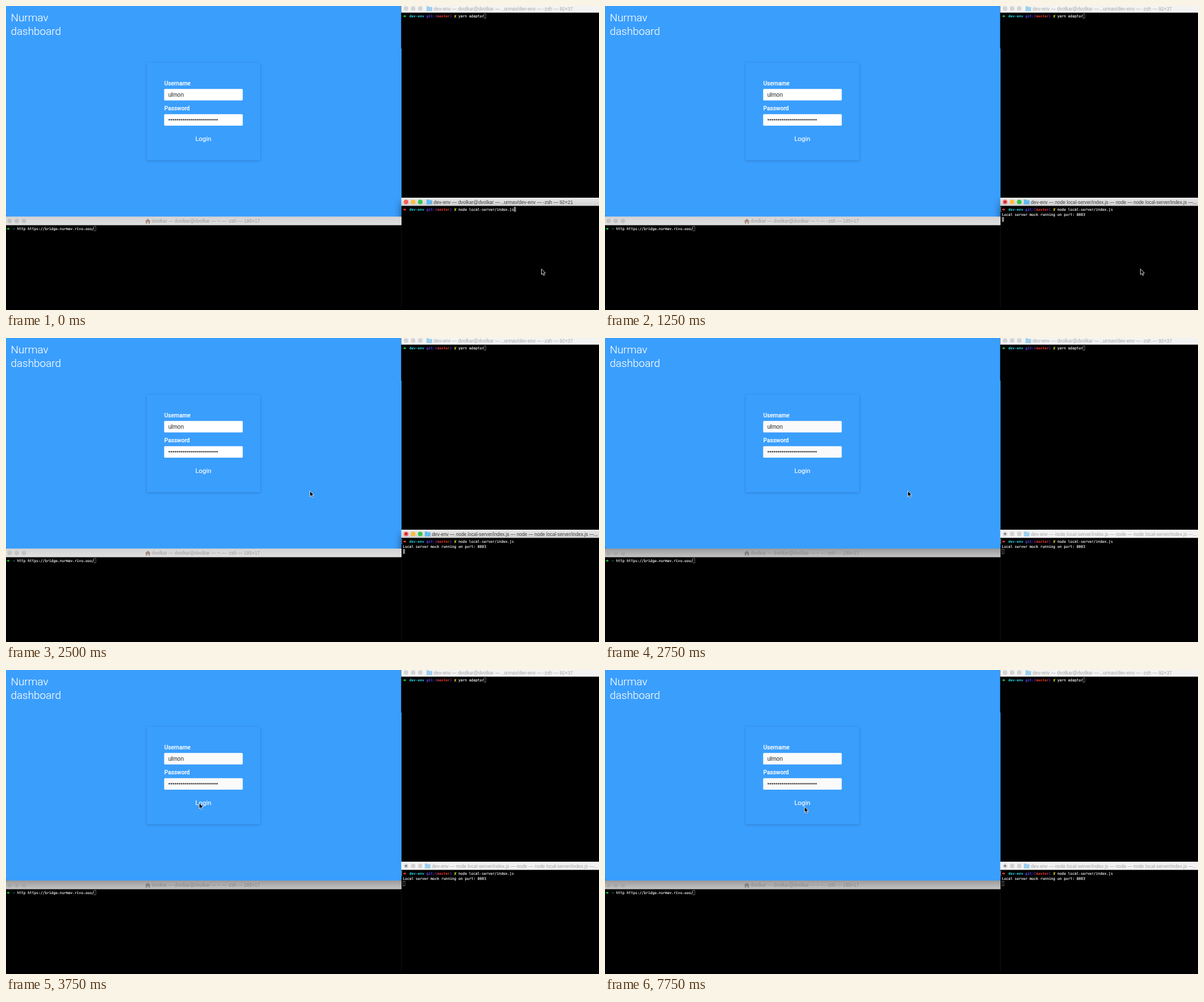
An HTML page for the animation above (8000 ms loop, 1045 by 536 pixels).

```html
<!DOCTYPE html>
<html lang="en">
<head>
<meta charset="utf-8">
<title>Dashboard login</title>
<style>
  html, body { margin: 0; width: 100%; height: 100%; overflow: hidden; background: #000; }
  svg { display: block; width: 100%; height: 100%; }
  text { white-space: pre; }
  .title { font: 8.45px "Liberation Sans", Arial, sans-serif; }
  .term { font: 6.25px "DejaVu Sans Mono", monospace; fill: #fff; stroke: #fff; stroke-width: .15px; }
  .term .c { font-weight: bold; stroke: none; }
  .web { font-family: Roboto, sans-serif; fill: #fff; }
  .web text { stroke: #fff; stroke-width: .15px; }
  .web .typed { font-family: "Liberation Sans", Arial, sans-serif; fill: #222; stroke: none; }
</style>
</head>
<body>
<svg id="stage" viewBox="0 0 1045 536">
  <defs>
    <filter id="blur" x="-20%" y="-20%" width="140%" height="140%"><feGaussianBlur stdDeviation="7"/></filter>
    <filter id="soft" x="-10%" y="-10%" width="120%" height="120%"><feGaussianBlur stdDeviation="2.2"/></filter>
    <linearGradient id="active" x2="0" y2="1"><stop stop-color="#e9e9e9"/><stop offset="1" stop-color="#d0d0d0"/></linearGradient>
    <linearGradient id="shade" x2="0" y2="1"><stop stop-color="#9a9a9a"/><stop offset="1" stop-color="#c4c4c4"/></linearGradient>
    <linearGradient id="dim" x2="0" y2="1"><stop stop-color="#d2d2d2"/><stop offset="1" stop-color="#e0e0e0"/></linearGradient>
    <clipPath id="pageClip"><rect width="697" height="371.5"/></clipPath>
  </defs>
  <rect width="1045" height="536"/>
  <g id="left"></g>
  <g id="page" class="web" clip-path="url(#pageClip)">
    <path d="M0 0H697V368.5Q697 371.5 694 371.5H3Q0 371.5 0 368.5Z" fill="#3a9efd"/>
    <rect x="696" width="1" height="75" fill="#16395c"/>
    <g font-size="18.9" font-weight="300">
      <text x="8.5" y="27">Nurmav</text>
      <text x="8.5" y="51">dashboard</text>
    </g>
    <rect x="248" y="101" width="200" height="172" fill="#000" opacity=".2" filter="url(#soft)"/>
    <rect x="248" y="100" width="200" height="172" rx="1" fill="#3a9efd"/>
    <g font-size="10.15" font-weight="500">
      <text x="279" y="139.5">Username</text>
      <text x="279" y="184">Password</text>
    </g>
    <g id="fields">
      <rect x="278.7" y="146.3" width="138.5" height="20.2" rx="1.5"/>
      <rect x="278.7" y="190.8" width="138.5" height="20.2" rx="1.5"/>
    </g>
    <text class="typed" x="286" y="159.7" font-size="10">ulmon</text>
    <g id="dots" fill="#222"></g>
    <text x="333.7" y="238.3" font-size="11.4">Login</text>
    <rect id="glow" x="697" y="347" width="348" height="200" fill="#000" opacity=".5" filter="url(#blur)"/>
  </g>
  <g id="right"></g>
  <path id="pointer" d="M.5 .6V10.6L2.8 8.5L4.4 12.2L6.1 11.5L4.6 7.9H7.6Z" fill="#000" stroke="#fff" stroke-width=".8"/>
</svg>
<script>
const LOOP = 8000, STEP = 250, COL = 3.76;
const $ = id => document.getElementById(id);

const lights = (x, y, colors) => colors.map((c, i) =>
  `<circle cx="${x + i * 12.5}" cy="${y}" r="4" fill="${c}"/>`).join('');

const folder = (x, y, opacity) =>
  `<path d="M${x} ${y}h4l1 1.2h5v7.3h-10z" fill="#62b9ec" opacity="${opacity}"/>`;

const house = (x, y, color) =>
  `<path d="M${x} ${y + 4.5}l5-4.5 5 4.5h-1.4v4.2h-2.4v-3h-2.4v3h-2.4v-4.2z" fill="${color}"/>`;

const title = (x, y, color, text, size = 8.45) =>
  `<text class="title" x="${x}" y="${y}" fill="${color}" style="font-size:${size}px">${text}</text>`;

const arrow = (x, y, color) =>
  `<path d="M${x + .5} ${y - 3.1}h2.4v-1.6l3 2.4-3 2.4v-1.6h-2.4z" fill="${color}"/>`;

const cross = (x, y) =>
  `<path d="M${x + .5} ${y}l3.2-4.6M${x + .9} ${y - 4.4}l2.2 4.4" stroke="#d8d823" stroke-width="1.1"/>`;

const block = (x, y, filled) => filled
  ? `<rect x="${x}" y="${y}" width="3.7" height="8.6" fill="#858585"/>`
  : `<rect x="${x + .3}" y="${y + .3}" width="3.3" height="8" fill="none" stroke="#858585" stroke-width=".7"/>`;

const line = (x, y, text) => `<text class="term" x="${x}" y="${y}">${text}</text>`;
const span = (x, col, color, text) =>
  `<tspan class="c" x="${x + col * COL}" fill="${color}">${text}</tspan>`;

function prompt(x, y, arrowColor, command) {
  return arrow(x, y, arrowColor) + cross(x + 24 * COL, y) + line(x, y,
    span(x, 3, '#2ed3e0', 'dev-env') + span(x, 11, '#5948ee', 'git:(') +
    span(x, 16, '#e8392c', 'master') + span(x, 22, '#5948ee', ')') +
    `<tspan x="${x + 26 * COL}">${command}</tspan>`);
}

function leftWindow(covered) {
  const ink = covered ? '#868686' : '#9c9c9c', light = covered ? '#a8a8a8' : '#c3c3c3';
  return `<rect y="371" width="697" height="15.5" fill="url(#${covered ? 'shade' : 'dim'})"/>` +
    lights(6.5, 379, Array(3).fill(light)) +
    house(245, 375, covered ? '#808080' : '#a58b7c') +
    title(257, 382.3, ink, 'dvolkar — dvolkar@dvolkar — ~ — -zsh — 185×17', 8.4) +
    arrow(.7, 395.1, '#25c23a') +
    line(.7, 395.1, span(.7, 3, '#2ed3e0', '~') +
      `<tspan x="${.7 + 5 * COL}">http https://bridge.nurmav.rivo.ooo/</tspan>`) +
    block(154.6, 388, false);
}

// phase: 0 typed command, 1 started, 2 server running
function rightWindows(phase, focused) {
  const x = 699.4, gray = Array(3).fill('#d3d3d3');
  const shell = 'dev-env — dvolkar@dvolkar — ..urmav/dev-env — -zsh — 92×';
  const ink = focused ? '#3e3e3e' : '#a6a6a6';
  const heads = [
    [753.5, shell + '21', 8.45],
    [757, 'dev-env — node — node local-server/index.js — 92×21', 8.45],
    [750.5, 'dev-env — node local-server/index.js — node — node local-server/index.js —...', 8.3]
  ];
  const [headX, text, size] = heads[phase];
  const carets = [[894.9, 354.2], [x, 363.2], [x, 372]];
  const bar = (y, height, fill) =>
    `<rect x="696.5" y="${y}" width="348.5" height="${height}" fill="${fill}"/>`;
  let out = '<rect x="697" width="348" height="536"/>' +
    '<path d="M696.7 386V533" stroke="#222" stroke-width=".6"/>' +
    bar(0, 11.7, '#f3f3f3') +
    lights(705, 4.5, gray) + folder(741, .6, .6) + title(753.5, 7.7, '#a6a6a6', shell + '37') +
    prompt(x, 20.3, '#25c23a', 'yarn adaptor') + block(842, 13.4, false) +
    bar(338, 14.4, focused ? 'url(#active)' : '#f3f3f3') +
    lights(705, 345.4, focused ? ['#fc5b57', '#fdbc40', '#34c84a'] : gray) +
    folder(headX - 12.4, 341.3, focused ? 1 : .6) + title(headX, 348.6, ink, text, size) +
    prompt(x, 361.2, '#f03a2e', 'node local-server/index.js') +
    block(...carets[phase], focused);
  if (phase > 0) {
    out += `<circle cx="705" cy="345.4" r="1.4" fill="${focused ? '#6b0d0b' : '#555'}"/>` +
      '<path d="M699 355H697.6V362.4H699" fill="none" stroke="#a0a0a0" stroke-width=".6"/>';
  }
  if (phase > 1) out += line(x, 370, 'Local server mock running on port: 8003');
  return out;
}

const path = [
  [0, 943, 463], [2000, 559, 463], [2250, 486.5, 259], [2500, 535, 269], [2750, 533, 269],
  [3000, 365, 238], [3250, 323, 227], [3500, 340, 233], [3750, 340, 234], [7750, 351, 240.5]
];

$('dots').innerHTML = Array.from({ length: 25 }, (_, i) =>
  `<circle cx="${287.8 + i * 3.5}" cy="200.5" r="1.25"/>`).join('');

let shown = '';
function render(time) {
  const t = Math.floor(time % LOOP / STEP) * STEP;
  const [, px, py] = path.filter(p => p[0] <= t).pop();
  $('pointer').setAttribute('transform', `translate(${px} ${py})`);

  const phase = t < 1000 ? 0 : t < 1250 ? 1 : 2, focused = t < 2750;
  const key = phase + '|' + focused;
  if (key === shown) return;
  shown = key;
  $('left').innerHTML = leftWindow(!focused);
  $('right').innerHTML = rightWindows(phase, focused);
  $('fields').setAttribute('fill', focused ? '#fff' : '#fafafa');
  $('glow').setAttribute('visibility', focused ? 'visible' : 'hidden');
}

const start = performance.now();
function tick() {
  render(performance.now() - start);
  requestAnimationFrame(tick);
}
tick();
</script>
</body>
</html>
```
